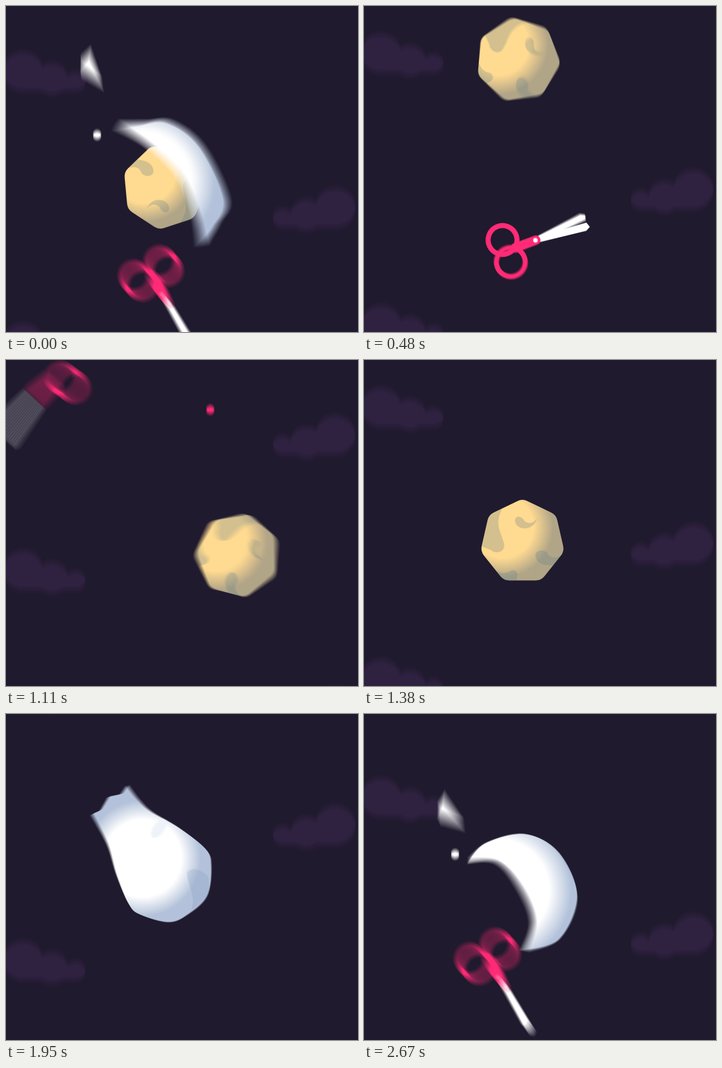
Animation, 622 px wide and 576 px high, one loop 2.7 s. Source, as an HTML page with a canvas:

```html
<!DOCTYPE html>
<html lang="en">
<head>
<meta charset="utf-8">
<title>Rock, paper, scissors</title>
<style>
html, body { margin: 0; width: 622px; height: 576px; overflow: hidden; background: #1f1a2d; }
canvas { display: block; }
</style>
</head>
<body>
<canvas id="stage" width="622" height="576"></canvas>
<script>
const W = 622, H = 576, STEP = 30, FRAMES = 90, LEVELS = 4, SHUTTER = 0.5;
const RAD = Math.PI / 180;
const PINK = '#ff2b76', WHITE = '#ffffff', PAPER_SHADE = '#b3c2da';

// One buffer per averaging level; the last one is shown.
const buffers = [];
for (let i = 0; i <= LEVELS; i++) {
  const c = i === LEVELS ? document.getElementById('stage') : document.createElement('canvas');
  c.width = W;
  c.height = H;
  buffers.push(c.getContext('2d', { alpha: false }));
}
const ctx = buffers[0];

// Smooth value at t through rows of [time, ...values].
function at(keys, t) {
  const n = keys.length - 1;
  if (t <= keys[0][0]) return keys[0].slice(1);
  if (t >= keys[n][0]) return keys[n].slice(1);
  let i = 0;
  while (t > keys[i + 1][0]) i++;
  const a = keys[i], b = keys[i + 1], p = keys[Math.max(i - 1, 0)], q = keys[Math.min(i + 2, n)];
  const d = b[0] - a[0], u = (t - a[0]) / d, u2 = u * u, u3 = u2 * u;
  return a.slice(1).map((v, k) => {
    const w = b[k + 1];
    const m = (w - p[k + 1]) / (b[0] - p[0]) * d;
    const e = (q[k + 1] - v) / (q[0] - a[0]) * d;
    return v * (2 * u3 - 3 * u2 + 1) + m * (u3 - 2 * u2 + u) + w * (3 * u2 - 2 * u3) + e * (u3 - u2);
  });
}

function pairs(flat) {
  const out = [];
  for (let i = 0; i < flat.length; i += 2) out.push([flat[i], flat[i + 1]]);
  return out;
}

// Spline from the current point, which must be pts[0].
function spline(pts) {
  const get = i => pts[Math.max(0, Math.min(pts.length - 1, i))];
  for (let i = 0; i < pts.length - 1; i++) {
    const p = get(i - 1), a = get(i), b = get(i + 1), q = get(i + 2);
    ctx.bezierCurveTo(a[0] + (b[0] - p[0]) / 6, a[1] + (b[1] - p[1]) / 6,
      b[0] - (q[0] - a[0]) / 6, b[1] - (q[1] - a[1]) / 6, b[0], b[1]);
  }
}

function disc(x, y, r, fill) {
  ctx.beginPath();
  ctx.arc(x, y, r, 0, 2 * Math.PI);
  ctx.fillStyle = fill;
  ctx.fill();
}

function polygon(pts, fill) {
  ctx.beginPath();
  pts.forEach(p => ctx.lineTo(p[0], p[1]));
  ctx.closePath();
  ctx.fillStyle = fill;
  ctx.fill();
}

function shade(x, y, r, soft, light, dark) {
  const g = ctx.createRadialGradient(x, y, r - soft, x, y, r + soft);
  g.addColorStop(0, light);
  g.addColorStop(1, dark);
  return g;
}

// ---------- clouds ----------
const cloud = new Path2D();
[[30, 116, 36], [81, 129, 29], [123, 134, 18]].forEach(([x, y, r]) => {
  cloud.moveTo(x + r, y);
  cloud.arc(x, y, r, 0, 2 * Math.PI);
});
cloud.rect(30, 120, 70, 32);
cloud.rect(95, 134, 28, 18);

function drawClouds(f) {
  const y = -(((f * 32) % 480) + 480) % 480;
  ctx.fillStyle = '#2f2140';
  for (let k = -1; k < 3; k++) {
    ctx.save();
    ctx.translate(0, y + k * 480);
    ctx.fill(cloud);
    ctx.translate(612, 241);
    ctx.scale(-1, 1);
    ctx.fill(cloud);
    ctx.restore();
  }
}

// ---------- rock: x, y, turn ----------
const rockKeys = [
  [-1, 280, 320, 189], [0, 280, 320, 187.6], [4, 279, 306, 170], [16, 272, 95, 43.4], [22, 268, 112, 5],
  [27, 335, 345, -75], [29, 435, 370, -125], [31, 520, 382, -180], [36, 430, 350, -280],
  [43, 283, 321, -356], [46, 280, 321, -360], [54, 284, 320, -360], [58, 306, 318, -365]
];
const craters = new Path2D(
  'M26-41C18-30 8-32 3-37C-2-47-14-46-13-36C-10-20 18-17 26-41Z' +
  'M74 22C60 30 50 30 45 22C40 12 22 14 23 25C26 46 60 46 74 32Z' +
  'M-36-58C-50-30-38-18-33 2C-28 20-50 22-55 15L-80 5L-70-50Z' +
  'M-45 52C-35 58-25 55-20 51C-12 48-6 56-10 64L-12 72L-50 72Z');

function drawRock(f) {
  const [x, y, turn] = at(rockKeys, f);
  const corner = i => [76 * Math.sin(i * 2 * Math.PI / 7), -76 * Math.cos(i * 2 * Math.PI / 7)];
  ctx.save();
  ctx.translate(x, y);
  ctx.rotate(turn * RAD);
  ctx.beginPath();
  const a = corner(0), b = corner(1);
  ctx.moveTo((a[0] + b[0]) / 2, (a[1] + b[1]) / 2);
  for (let i = 1; i <= 7; i++) ctx.arcTo(...corner(i), ...corner(i + 1), 20);
  ctx.closePath();
  ctx.rotate(-turn * RAD);
  ctx.fillStyle = shade(-35, -26, 72, 17, '#ffda91', '#b1a588');
  ctx.fill();
  ctx.clip();
  ctx.rotate(turn * RAD);
  ctx.fillStyle = 'rgba(95,122,135,.27)';
  ctx.fill(craters);
  ctx.restore();
}

// ---------- paper: ten outline points, sharp at the 1st and 7th ----------
const cup = [240,225, 196,290, 222,375, 313,412, 395,375, 420,290, 390,225, 372,300, 314,347, 258,300];
const gone = [330,60, 400,70, 470,110, 530,170, 570,260, 560,310, 545,360, 530,290, 490,210, 420,140];
const wrapKeys = [
  [50, ...cup.map((v, i) => i % 2 ? v + 420 : 314 + (v - 314) * 1.7)],
  [57, ...cup],
  [58, 244,219, 208,285, 234,362, 314,397, 386,362, 408,285, 386,219, 362,262, 316,281, 270,262],
  [59, 262,226, 214,285, 240,355, 315,390, 380,355, 402,285, 368,226, 345,222, 316,216, 286,222]
];
const openKeys = [
  [87, 190,270, 215,232, 280,215, 340,240, 374,320, 345,385, 255,400, 222,385, 195,345, 185,305],
  [89, 182,262, 215,228, 285,212, 345,245, 377,322, 345,398, 280,420, 298,365, 274,305, 235,262],
  [90, 190,208, 240,206, 288,204, 345,247, 390,342, 372,388, 347,427, 333,365, 305,300, 250,247],
  [94, ...gone],
  [98, ...gone.map((v, i) => v + (i % 2 ? -440 : 160))]
];

function drawSheet(keys, t, lx, ly, r) {
  const p = pairs(at(keys, t));
  ctx.beginPath();
  ctx.moveTo(...p[0]);
  spline(p.slice(0, 7));
  spline([...p.slice(6), p[0]]);
  ctx.closePath();
  ctx.fillStyle = shade(lx, ly, r, 20, WHITE, PAPER_SHADE);
  ctx.fill();
}

// Wrapped bundle: x, y, turn
const bundleKeys = [[59, 314, 305, 66], [68, 272, 272, 10], [74, 258, 262, 0], [81, 264, 288, -5], [87, 278, 315, -14]];
const bundle = pairs([92,227, 140,262, 180,305, 222,341, 248,348, 298,338, 322,312, 339,266, 322,215,
  300,193, 240,180, 185,176, 155,167, 126,153]);
const neck = pairs([123,172, 105,186, 103,214]);
const dents = new Path2D('M289 245C290 230 315 230 326 235L341 262L325 302C322 272 300 267 289 245Z');

function drawBundle(f) {
  const [x, y, turn] = at(bundleKeys, f);
  ctx.save();
  ctx.translate(x, y);
  ctx.rotate(turn * RAD);
  ctx.translate(-258, -262);
  ctx.beginPath();
  ctx.moveTo(...bundle[0]);
  spline(bundle);
  neck.forEach(p => ctx.lineTo(...p));
  ctx.closePath();
  ctx.setTransform(1, 0, 0, 1, x, y);
  ctx.fillStyle = shade(-43, -27, 86, 17, WHITE, PAPER_SHADE);
  ctx.fill();
  ctx.clip();
  ctx.rotate(turn * RAD);
  ctx.translate(-258, -262);
  ctx.fillStyle = 'rgba(130,155,190,.28)';
  ctx.fill(dents);
  ctx.beginPath();
  ctx.ellipse(210, 196, 9, 20, 0.15, 0, 2 * Math.PI);
  ctx.fillStyle = '#edf3f8';
  ctx.fill();
  ctx.restore();
}

// ---------- scissors: x, y, angle for each half ----------
const together = [
  [81, 150, -170, -60], [84, 130, 60, 15], [87, 170, 380, 54], [89, 244, 473, 60], [90, 282, 517, 60],
  [92, 350, 590, 55], [97, 400, 660, 20], [103, 312, 436, -20]
];
const halfA = [...together, [106, 303, 414, -15], [109, 300, 405, 8], [114, 330, 390, 25], [117, 405, 360, 72],
  [119, 485, 324, 120], [121, 563, 288, 168], [129, 850, 120, 360]];
const halfB = [...together, [106, 303, 414, -26], [109, 300, 405, -46], [114, 330, 390, -90], [117, 420, 490, -108],
  [119, 419, 447, -60], [121, 395, 398, -12], [125, 190, 190, 84], [130, -160, -140, 200]];

function drawHalf([x, y, angle], side) {
  ctx.save();
  ctx.translate(x, y);
  ctx.rotate(angle * RAD);
  ctx.scale(1, side);
  polygon([[2, -5], [95, -7], [99, 2], [91, 7], [2, 5]], WHITE);
  ctx.strokeStyle = PINK;
  ctx.lineCap = 'round';
  ctx.lineWidth = 9;
  ctx.beginPath();
  ctx.arc(-52, 26, 25.5, 0, 2 * Math.PI);
  ctx.stroke();
  ctx.lineWidth = 16;
  ctx.beginPath();
  ctx.moveTo(-38, 4);
  ctx.lineTo(1, 0);
  ctx.stroke();
  ctx.restore();
}

function drawScissors(t) {
  const a = at(halfA, t), b = at(halfB, t);
  drawHalf(b, -1);
  drawHalf(a, 1);
  if (t < 114) disc(a[0], a[1], 4, WHITE);
}

// ---------- bits thrown off by each hit ----------
function drawBits(f, late) {
  if (f >= 26.5 && f < 43) disc(361, 288 - 20 * (f - 27), 7.3, PINK);
  if (late < 86.5 || late > 104) return;
  const n = late - 90;
  disc(161, 228 - 20 * n, 7.3, WHITE);
  ctx.save();
  ctx.translate(148, 110 - 65 * n);
  ctx.rotate(15 * n * RAD);
  polygon([[0, -28], [-17, -10], [-15, 4], [24, 30]], WHITE);
  ctx.restore();
}

function scene(f) {
  f = (f + FRAMES) % FRAMES;
  const early = f > 89 ? f - FRAMES : f;
  const late = f < 45 ? f + FRAMES : f;
  ctx.fillStyle = '#1f1a2d';
  ctx.fillRect(0, 0, W, H);
  drawClouds(f);
  if (f < 57.5 || f >= 89.5) drawRock(f >= 89.5 ? early : f);
  if (late >= 86.5 && late < 98) drawSheet(openKeys, late, 237 + Math.max(0, late - 90) * 42, 312 - Math.max(0, late - 90) * 28, 110);
  else if (f >= 59.5 && f < 86.5) drawBundle(f);
  else if (f >= 50 && f < 59.5) drawSheet(wrapKeys, f, 270, 268 + Math.max(0, 57 - f) * 60, 97);
  if (late >= 81 && late < 131) drawScissors(late);
  drawBits(f, late);
}

// Mean picture over a time span, halving it until one moment is left.
function expose(level, from, span) {
  if (level === 0) return scene(from + span / 2);
  const out = buffers[level], part = buffers[level - 1].canvas;
  expose(level - 1, from, span / 2);
  out.globalAlpha = 1;
  out.drawImage(part, 0, 0);
  expose(level - 1, from + span / 2, span / 2);
  out.globalAlpha = 0.5;
  out.drawImage(part, 0, 0);
}

let shown = -1;
const start = performance.now();
function tick() {
  const f = Math.floor((performance.now() - start) / STEP) % FRAMES;
  if (f !== shown) {
    shown = f;
    expose(LEVELS, f - SHUTTER / 2, SHUTTER);
  }
  requestAnimationFrame(tick);
}
tick();
</script>
</body>
</html>
```
